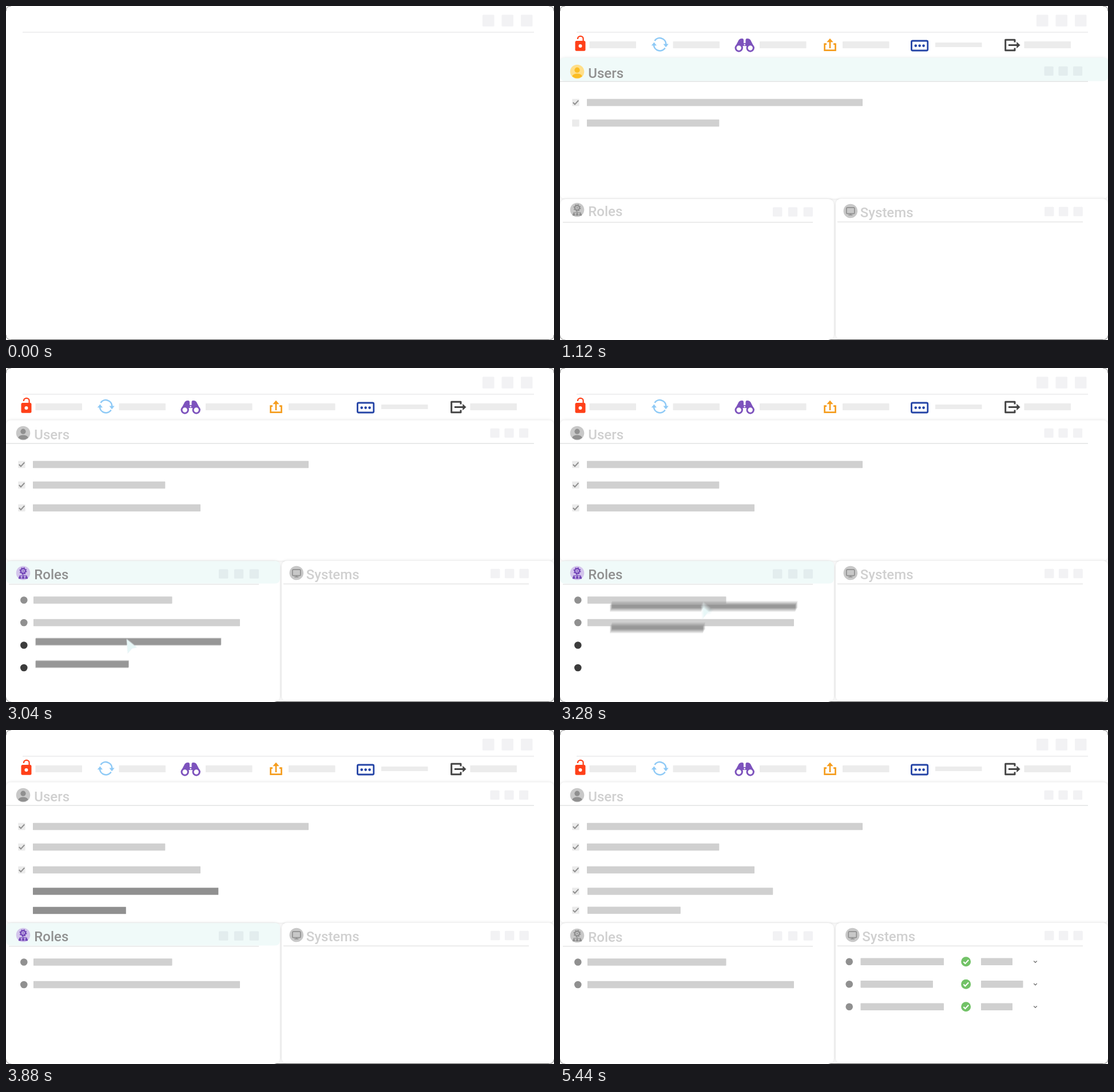
An HTML page that plays this animation: 958x585 px, repeating every 5600 ms.

```html
<!DOCTYPE html>
<html lang="en">
<head>
<meta charset="utf-8">
<title>Access management</title>
<style>
  html, body { margin: 0; width: 100%; height: 100%; overflow: hidden; background: #fff; }
  svg { display: block; width: 958px; height: 585px; }
  text { font: 500 24px Roboto, Arial, sans-serif; }
  .panel { fill: #fff; filter: drop-shadow(0 0 2.5px rgba(0, 0, 0, .13)); }
  .line { fill: none; }
  #drag { isolation: isolate; }
  #drag g { mix-blend-mode: plus-lighter; }
</style>
</head>
<body>
<svg id="stage" viewBox="0 0 958 585" xmlns="http://www.w3.org/2000/svg">
  <g class="line" stroke="#666" stroke-width=".8">
    <path d="M0 9Q0 0 9 0M949 0Q958 0 958 9M0 576Q0 584.5 9 584.5M949 584.5Q958 584.5 958 576"/>
    <path d="M9 584.5H949" stroke="#333"/>
  </g>
  <path d="M29 45.800H923" stroke="#ededee" stroke-width="1.8"/>
  <g id="base">
    <rect class="panel" x="0" y="91.500" width="957.500" height="246" rx="8"/>
    <rect class="panel" x="0" y="338" width="479" height="247" rx="10"/>
    <rect class="panel" x="482" y="337.500" width="476" height="246.500" rx="9"/>
    <g id="bands"></g>
    <path d="M0 132.200H923" stroke="#e2e4e4" stroke-width="1.500"/>
    <path d="M5 378.800H442M485 378.300H914" stroke="#e6e6e6" stroke-width="1.400"/>
    <g id="tools">
      <g fill="#ff4019">
        <rect x="26.500" y="61" width="18" height="17.800" rx="2.500"/>
        <path class="line" d="M31 58v-.8a4.800 4.300 0 0 1 9.600 0v5" stroke="#ff4019" stroke-width="2.300"/>
        <circle cx="35.500" cy="70" r="3" fill="#fff"/>
      </g>
      <g fill="#8fcaf6">
        <path class="line" d="M165.500 61A10.800 10.800 0 0 1 185.300 67M183.700 73.500A10.800 10.800 0 0 1 163.900 68" stroke="#8fcaf6" stroke-width="2.600"/>
        <path d="M180.500 66.500h9.200l-4.600 5.700zM159.800 69.200h9.200l-4.600-5.700z"/>
      </g>
      <g fill="#7d53bd">
        <path d="M305.500 73L312.500 59.500Q314 57 317 57H319Q321 57 321 59.500V65H324.500V59.500Q324.500 57 326.500 57H328.500Q331.500 57 333 59.500L340 73L326 74V70H319.500V74Z"/>
        <g fill="#fff" stroke="#7d53bd" stroke-width="3"><circle cx="312.700" cy="73.500" r="5.700"/><circle cx="332.700" cy="73.500" r="5.700"/></g>
        <circle cx="322.700" cy="67.800" r="1.300" fill="#fff"/>
      </g>
      <g fill="#f59d1e">
        <path class="line" d="M466 66.700H462.600V77.700H481.500V66.700H478M472 74V61" stroke="#f59d1e" stroke-width="2.700"/>
        <path d="M466.300 63.200L472 56.800L477.700 63.200Z"/>
      </g>
      <g fill="#2444a6">
        <rect class="line" x="614.500" y="61" width="28.300" height="17" rx="2" stroke="#2444a6" stroke-width="2.800"/>
        <circle cx="621.800" cy="69.600" r="2.300"/><circle cx="628.700" cy="69.600" r="2.300"/><circle cx="635.600" cy="69.600" r="2.300"/>
      </g>
      <g fill="#454545">
        <path class="line" d="M795 63.500V59.300H778.700V77.700H795V73.500M784 68.500H800" stroke="#454545" stroke-width="3" stroke-linejoin="round"/>
        <path d="M798.300 62.800L804.500 68.500L798.300 74.200Z"/>
      </g>
    </g>
    <g id="heads"></g>
  </g>
  <g id="squares" fill="#14143c" fill-opacity=".055"></g>
  <g id="rows"></g>
  <g id="drag"></g>
</svg>
<script>
const NS = 'http://www.w3.org/2000/svg';
const LOOP = 5600, STEP = 40;
const LIGHT = '#d0d0d0', MID = '#909090', DARK = '#3c3c3c', PALE = '#ebebeb';
const $ = id => document.getElementById(id);

function add(parent, tag, attrs = {}) {
  const el = document.createElementNS(NS, tag);
  for (const k in attrs) el.setAttribute(k, attrs[k]);
  parent.appendChild(el);
  return el;
}
const group = (parent, x = 0, y = 0) => add(parent, 'g', { transform: `translate(${x} ${y})` });
const bar = (parent, x1, x2, y, fill = LIGHT, h = 12.4) =>
  add(parent, 'rect', { x: x1, y: y - h / 2, width: x2 - x1, height: h, rx: .6, fill });
const dot = (parent, x, y, fill = MID) => add(parent, 'circle', { cx: x, cy: y, r: 6.3, fill });
const stroke = (parent, d, color, width) =>
  add(parent, 'path', { d, fill: 'none', stroke: color, 'stroke-width': width });
const show = (el, a) => el.setAttribute('opacity', a);
const clamp = v => Math.min(1, Math.max(0, v));
// Opacity that rises over n ticks, the first change being visible at `from`
const rise = (t, from, n) => clamp((t - from + STEP) / (STEP * n)) ** 1.2;
const smooth = p => p * p * (3 - 2 * p);

// Static squares and toolbar labels
[[833, 866.5, 900, 25.500, 20.500], [846.500, 871.500, 897, 113.800, 16.200],
 [372, 398.800, 425.600, 360.600, 16.400], [847, 872, 897.500, 360, 16.400]].forEach(([a, b, c, y, s], i) =>
  [a, b, c].forEach(x => add(i ? $('base') : $('squares'), 'rect',
    { x, y: y - s / 2, width: s, height: s, rx: 1.500, fill: '#14143c', 'fill-opacity': .055 })));
[51.5, 197.5, 349, 494, 656, 811.5].forEach((x, i) =>
  bar($('tools'), x, x + 81.500, 68, '#ececec', i === 4 ? 8 : 12));

// Panel headings
const glyphs = {
  Users(g, c) {
    add(g, 'circle', { cy: -2.800, r: 4.600, fill: c });
    add(g, 'path', { d: 'M-8.500 8.500C-8.500 1.800 8.500 1.800 8.500 8.500Q0 14.500-8.500 8.500Z', fill: c });
  },
  Roles(g, c) {
    add(g, 'circle', { cy: -3.500, r: 4, fill: 'none', stroke: c, 'stroke-width': 2.400 });
    add(g, 'circle', { cy: -3.500, r: 5.600, fill: 'none', stroke: c, 'stroke-width': 1.800, 'stroke-dasharray': '2.200 2.198' });
    add(g, 'circle', { cy: -3.500, r: 1.300, fill: c });
    stroke(g, 'M0 2V6M-6 7V4.800H6V7', c, 1.200);
    for (const x of [-5.700, 0, 5.700])
      add(g, 'path', { d: `M${x - 2.400} 10.300q0-4.600 2.400-4.600t2.400 4.600z`, fill: c });
  },
  Systems(g, c) {
    add(g, 'rect', { x: -7, y: -5.800, width: 14, height: 10.500, rx: 1.200, fill: 'none', stroke: c, 'stroke-width': 1.700 });
    stroke(g, 'M-3.500 7H3.500M0 5V7', c, 1.700);
  }
};

function heading(name, x, y, poses, disc, ink, band, on, off) {
  const bandEl = add($('bands'), 'path', { d: band, fill: '#f0faf9' });
  const states = poses.map(([dx, dy], i) => {
    const live = i === 1, g = group($('heads'), x + dx, y + dy);
    add(g, 'circle', { r: 12.300, fill: live ? disc : '#c8c8c8' });
    glyphs[name](g, live ? ink : MID);
    add(g, 'text', { x: name === 'Systems' ? 17 : 19.300, y: 11, fill: live ? MID : LIGHT }).textContent = name;
    return g;
  });
  return t => {
    const a = rise(t, ...on), b = rise(t, ...off);
    [1 - a, a * (1 - b), b].forEach((v, i) => show(states[i], v));
    show(bandEl, a * (1 - b));
  };
}
const box = (x1, x2, y1, y2) =>
  `M${x1} ${y1 + 8}q0-8 8-8H${x2 - 8}q8 0 8 8V${y2 - 9}q0 9-9 9H${x1 + 9}q-9 0-9-9Z`;
const heads = [
  heading('Users', 30, 114, [[0, 0], [0, 1], [0, 0]], '#ffdf8a', '#fbbd23', box(0, 958, 90.500, 131.500), [400, 2], [2000, 2]),
  heading('Roles', 30, 357, [[0, 0], [0, 2], [0, 3]], '#d3c5ec', '#7346b8', box(0, 479, 338, 377.500), [2000, 2], [4200, 2]),
  heading('Systems', 507.800, 359, [[0, 0], [3.500, 0], [3.500, 0]], '#bbdefb', '#1e88e5', box(482, 958, 338, 377.500), [4200, 2], [5360, 3])
];

// Things that simply fade in: [element, first tick, tick count]
const fades = [[$('base'), 40, 5]];

const tickMark = (parent, y) => stroke(parent, `M22.800 ${y}l3.200 3.200l6.300-6.800`, MID, 2);
[[169, 47, 529, 520, 4, 800], [205, 47, 278.300, 1000, 4, 1280], [245, 47, 340, 1480, 4, 1760],
 [282.500, 48, 372.300, 4040, 2, 4040], [315.700, 48, 210.800, 4040, 2, 4040]].forEach(([y, x1, x2, at, n, done]) => {
  const g = group($('rows'));
  add(g, 'rect', { x: 21.200, y: y - 6.200, width: 12.500, height: 12.500, rx: 1, fill: PALE });
  bar(g, x1, x2, y);
  fades.push([g, at, n], [tickMark($('rows'), y), done, 3]);
});

const roleRows = group($('rows')), roleDots = [], roleBars = [];
[[406.500, 290.500], [446, 409], [485.500, 372.300], [525, 210.800]].forEach(([y, x2]) => {
  roleDots.push(dot(roleRows, 31.300, y));
  roleBars.push(bar(roleRows, 48, x2, y));
});
fades.push([roleRows, 2160, 4]);

const systemRows = group($('rows'));
fades.push([systemRows, 4480, 3]);
[[405.800, 671, 791], [445.200, 652, 809.500], [484.800, 671, 791]].forEach(([y, a, b], i) => {
  dot(systemRows, 505.700, y);
  bar(systemRows, 525.500, a, y);
  bar(systemRows, 736, b, y);
  stroke(systemRows, `M828.200 ${y - 1.300}l2.800 2.800l2.800-2.800`, '#777', 1.400);
  const g = group($('rows'), 709.700, y);
  add(g, 'circle', { r: 8.500, fill: '#72c267' });
  stroke(g, 'M-4.300 .3L-1.300 3.300L4.500-3', '#fff', 2.100);
  fades.push([g, 4720 + i * 200, 6]);
});

// Dragged rows, smeared by averaging several moments
const GHOSTS = 8, SHUTTER = 20;
const route = document.createElementNS(NS, 'path');
route.setAttribute('d', 'M0 0L102-169C122-202 150-203-1-203');
const routeLength = route.getTotalLength();
const ghosts = Array.from({ length: GHOSTS }, () => {
  const g = add($('drag'), 'g', { opacity: 1 / GHOSTS });
  return {
    bars: [bar(g, 48, 372.300, 485.500), bar(g, 48, 210.800, 525)],
    cursor: add(g, 'path', { d: 'M0 0L18.500 15L9.500 17L2 26Z', fill: '#e6f0f4' })
  };
});

function mix(a, b, p) {
  const part = (c, i) => parseInt(c.slice(1 + 2 * i, 3 + 2 * i), 16);
  return `rgb(${[0, 1, 2].map(i => Math.round(part(a, i) + (part(b, i) - part(a, i)) * p))})`;
}

function drawDrag(t) {
  const picked = [rise(t, 2840, 2), rise(t, 2680, 2)];
  const active = t >= 2480 && t < 4120;
  const gone = rise(t, 3320, 3), settle = rise(t, 4040, 2);
  $('drag').setAttribute('visibility', active ? 'visible' : 'hidden');
  picked.forEach((p, i) => {
    roleDots[i + 2].setAttribute('fill', mix(MID, DARK, p));
    show(roleDots[i + 2], 1 - gone);
    show(roleBars[i + 2], t < 2480 ? 1 : 0);
  });
  if (!active) return;
  show($('drag'), 1 - settle);
  ghosts.forEach(({ bars, cursor }, k) => {
    const now = t + SHUTTER * k / GHOSTS;
    const s = smooth(clamp((now - 2900) / 980)) ** 1.4;
    const { x, y } = route.getPointAtLength(s * routeLength);
    const reach = smooth(clamp((now - 2700) / 200));
    bars.forEach((b, i) => {
      b.setAttribute('transform', `translate(${x} ${y + i * 6 * y / 203})`);
      b.setAttribute('fill', mix(LIGHT, MID, picked[i]));
    });
    cursor.setAttribute('transform', `translate(${158 + 49 * reach + x} ${521.500 - 41 * reach + y})`);
    cursor.setAttribute('visibility', t < 3880 ? 'inherit' : 'hidden');
  });
}

function draw(ms) {
  const t = Math.floor(ms % LOOP / STEP) * STEP;
  for (const [el, at, n] of fades) show(el, rise(t, at, n));
  for (const update of heads) update(t);
  drawDrag(t);
}

const start = performance.now();
function frame() {
  draw(performance.now() - start);
  requestAnimationFrame(frame);
}
frame();
</script>
</body>
</html>
```
